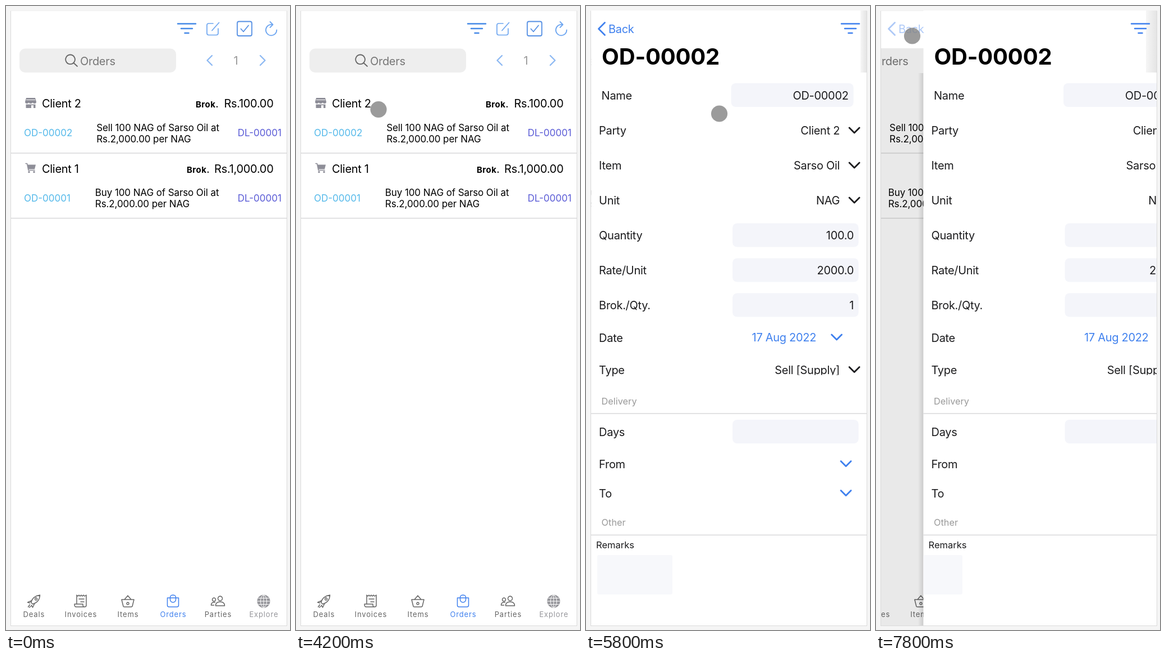
An HTML page for the animation above (8 s loop, 506 by 1107 pixels).

```html
<!DOCTYPE html>
<html lang="en">
<head>
<meta charset="utf-8">
<title>Orders</title>
<style>
  html, body { margin: 0; width: 100%; height: 100%; overflow: hidden; background: #f5f5f5; }
  svg { display: block; width: 506px; height: 1107px; }
  text { font-family: Inter, Roboto, sans-serif; white-space: pre; }
  .line { fill: none; stroke-linecap: round; stroke-linejoin: round; }
</style>
</head>
<body>
<svg viewBox="0 0 506 1107">
  <defs>
    <clipPath id="screen"><rect x="9" y="8" width="491" height="1091"/></clipPath>
    <clipPath id="typeClip"><rect x="300" y="625" width="160" height="29.5"/></clipPath>
    <linearGradient id="shade">
      <stop offset="0" stop-color="#000" stop-opacity="0"/>
      <stop offset="1" stop-color="#000" stop-opacity=".13"/>
    </linearGradient>
    <linearGradient id="edge">
      <stop offset="0" stop-color="#f6f6f6"/>
      <stop offset="1" stop-color="#e4e4e4"/>
    </linearGradient>
  </defs>
  <rect x="8.5" y="8" width="492" height="1091.5" fill="#fff" stroke="#dadada"/>
  <rect x="8" y="7" width="493" height="1.5" fill="#f5f5f5"/>
  <g clip-path="url(#screen)">
    <g id="list"></g>
    <rect id="dim" x="9" y="75" width="491" height="1024"/>
    <g id="listNav"></g>
    <g id="detail">
      <rect x="-1" y="119" width="10" height="980" fill="url(#shade)"/>
      <rect x="9" y="8" width="491" height="1091" fill="#fff"/>
      <g id="head"></g>
      <g id="form"></g>
    </g>
    <rect id="remarks" y="974" height="70" rx="3" fill="#f7f8fb"/>
    <rect id="band" y="8" height="110" fill="url(#edge)"/>
    <g id="back"></g>
    <g id="filter"></g>
  </g>
  <g id="move">
    <path d="M0-11 4.6-6H1.5V-1.5H6V-4.6L11 0 6 4.6V1.5H1.5V6H4.6L0 11-4.6 6H-1.5V1.5H-6V4.6L-11 0-6-4.6V-1.5H-1.5V-6H-4.6Z"
      stroke="#fff" stroke-width="2" paint-order="stroke"/>
  </g>
  <g id="touch">
    <circle id="ring" r="33.5" fill="none" stroke="#000" stroke-width="2.4"/>
    <circle r="14.6" fill="#808080" fill-opacity=".79"/>
  </g>
</svg>
<script>
const $ = id => document.getElementById(id);
const BLUE = '#3f80ee', INK = '#1c1c1e', GREY = '#8e8e98';

// Markup helpers
const text = (x, y, str, { size = 20, color = INK, anchor = 'start', weight = 400, track = -0.015 * size, extra = '' } = {}) =>
  `<text x="${x}" y="${y}" font-size="${size}" fill="${color}" text-anchor="${anchor}" font-weight="${weight}" letter-spacing="${track}" ${extra}>${str}</text>`;
const line = (d, color, width = 2) => `<path class="line" d="${d}" stroke="${color}" stroke-width="${width}"/>`;
const box = (x, y, w, h, r, fill) => `<rect x="${x}" y="${y}" width="${w}" height="${h}" rx="${r}" fill="${fill}"/>`;
const rule = y => box(9, y - 0.7, 491, 1.4, 0, '#d6d6d8');
const down = (x, y, color) => line(`M${x - 9} ${y - 4.5}l9 9 9-9`, color, 2.8);
const bars = (x, color) => line(`M${x - 16} 31.5h32M${x - 10} 40h20M${x - 3.5} 48h7`, color, 2.5);
const at = (x, y, body) => `<g transform="translate(${x} ${y})">${body}</g>`;

const store = `<path fill="${GREY}" d="M-8-9H8L10-2Q10 1 7 1 5 1 3.5-.5 2 1 0 1T-3.5-.5Q-5 1-7 1-10 1-10-2ZM-8.5 2.5H8.5V9H5V4H1V9H-8.5Z"/>
  <path stroke="#fff" d="M-8-5.5H8"/>`;
const cart = `<path fill="${GREY}" d="M-6-6H9L7 2H-4Z"/>` + line('M-9-8h2.5L-4 4H7', GREY, 1.6) +
  `<circle cx="-3" cy="7" r="1.7" fill="${GREY}"/><circle cx="6" cy="7" r="1.7" fill="${GREY}"/>`;

const row = (y, icon, name, fee, feeX, order, textX, verb) => {
  const note = { size: 17, color: '#000', track: -0.1 };
  return at(44, y - 1, icon) +
    text(64, y + 7, name, { color: '#000' }) +
    text(feeX, y + 7, 'Brok.', { size: 15, weight: 700, color: '#000', anchor: 'end', track: 0.5 }) +
    text(476.5, y + 7, fee, { color: '#000', anchor: 'end' }) +
    text(32, y + 58, order, { size: 17, color: '#54b9ea', track: 0 }) +
    text(textX, y + 48.5, `${verb} 100 NAG of Sarso Oil at`, note) +
    text(textX, y + 68.5, 'Rs.2,000.00 per NAG', note) +
    text(412.8, y + 58, 'DL-00001', { size: 17, color: '#5a5bd6', track: 0 }) +
    rule(y + 88);
};

// Each tab: label, centre, colour, icon drawn around the origin
const tabs = [
  ['Deals', 49.5, '#666', 'M-5 2Q-2-9 11-11 10 2-2 5ZM-4-1-11 2-7 3M1 5-2 11-4 7M-7 6-10 10M-4 8-8 11M4-6a2 2 0 1 0 .1 0'],
  ['Invoices', 133, '#666', 'M-7 5V-11L-5-9-3-11-1-9 1-11 3-9 5-11 7-9 10-11V7Q10 10 7 10H-8Q-11 10-11 5H4V8Q5 10 7 10M-3-4H6M0 1H6'],
  ['Items', 217, '#666', 'M-11-3H11L8 9Q7 10 6 10H-6Q-8 10-8 9ZM-6-3 0-10 6-3M0 2a2 2 0 1 0 .1 0'],
  ['Orders', 297.5, BLUE, 'M-10-6H10V7Q10 10 7 10H-7Q-10 10-10 7ZM-5-6V-7A5 4 0 0 1 5-7V-6M-5-3A5 5 0 0 0 5-3V-6M-5-3V-6'],
  ['Parties', 377.5, '#666', 'M4-9a4 4 0 1 0 .1 0M-4 8Q-4 1 4 1T12 8ZM-7-6a3 3 0 1 0 .1 0M-12 7Q-12 2-7 2H-5M-12 7H-7'],
];
const globe = `<circle r="11.5" fill="#96969b"/>` +
  `<g class="line" stroke="#fff" stroke-width="1"><path d="M0-11V11M-11 0H11M-9-5.5H9M-9 5.5H9"/><ellipse rx="5.5" ry="11"/></g>`;
const tabLabel = (x, label, color) =>
  text(x + 0.4, 1084, label, { size: 13, color, anchor: 'middle', track: 0.85 });

$('list').innerHTML =
  `<rect id="field" x="24" y="75.5" width="279" height="42.5" rx="10" fill="#eee"/>` +
  line('M114.5 86.5a8.3 8.3 0 1 0 .1 0M120.5 101 127 107', '#666', 1.8) +
  text(132, 104.5, 'Orders', { color: '#777' }) +
  line('M367 88l-8.5 8.5 8.5 8.5M453 88l8.5 8.5-8.5 8.5', '#8fbaf3', 2.4) +
  text(409.5, 104, '1', { color: '#999', anchor: 'middle' }) +
  row(173, store, 'Client 2', 'Rs.100.00', 379, 'OD-00002', 161.2, 'Sell') +
  row(288.5, cart, 'Client 1', 'Rs.1,000.00', 363, 'OD-00001', 158.8, 'Buy') +
  tabs.map(([label, x, color, d]) => at(x, 1056, line(d, color, 1.5)) + tabLabel(x, label, color)).join('') +
  at(459, 1056, globe) + tabLabel(459, 'Explore', '#96969b');

$('listNav').innerHTML =
  bars(322, '#4589e6') +
  line('M369 31H361Q358 31 358 34V48Q358 51.5 361 51.5H374.5Q378 51.5 378 48V40M367 43.5 379.5 29.5', '#6ea6f0', 1.7) +
  line('M415 27.5H435Q438 27.5 438 30.5V50Q438 53 435 53H415Q412 53 412 50V30.5Q412 27.5 415 27.5ZM418.5 40.5l4.5 5 9-11', '#5690e4', 1.8) +
  line('M474 33A9.7 9.7 0 1 0 482.3 42.5M470.5 28l5 5-5 5', '#6ea6f0', 1.8);

$('head').innerHTML =
  text(28, 103.5, 'OD-00002', { size: 40, weight: 700, color: '#000', track: -0.2 }) +
  text(27.5, 166, 'Name', { extra: 'id="name"' });

const input = (y, value) => box(261, y - 21, 224.5, 42, 8, '#f4f5fa') + text(477, y + 7, value, { anchor: 'end' });
const menu = (y, value, extra) => text(452, y + 7.5, value, { anchor: 'end', extra }) + down(478, y, INK);
const caption = (y, str) => text(27.5, y, str, { size: 16.3, color: '#999', track: 0 });
const fields = [
  ['Party', 220.5, menu(220.5, 'Client 2')],
  ['Item', 282.5, menu(282.5, 'Sarso Oil')],
  ['Unit', 344.5, menu(344.5, 'NAG')],
  ['Quantity', 406.5, input(406.5, '100.0')],
  ['Rate/Unit', 468.5, input(468.5, '2000.0')],
  ['Brok./Qty.', 530.5, input(530.5, '1')],
  ['Date', 588, text(410, 595, '17 Aug 2022', { color: BLUE, anchor: 'end' }) + down(446.5, 587.5, BLUE)],
  ['Type', 645, menu(645, 'Sell [Supply]', 'clip-path="url(#typeClip)"')],
  ['Days', 755.5, input(755, '')],
  ['From', 812.5, down(463, 812, BLUE)],
  ['To', 864.5, down(463, 864, BLUE)],
];
$('form').innerHTML =
  box(258.5, 137, 218, 42, 8, '#f4f5fa') + text(467.5, 166, 'OD-00002', { anchor: 'end' }) +
  fields.map(([label, y, body]) => text(23, y + 7.5, label) + body).join('') +
  caption(707, 'Delivery') + rule(723) + caption(922, 'Other') + rule(938.5) +
  text(18, 962, 'Remarks', { size: 16.5, track: 0 });

$('back').innerHTML = line('M33.5 29.5 22.5 40.5 33.5 51.5', BLUE, 2.8) + text(40, 48, 'Back', { color: BLUE });
$('filter').innerHTML = bars(471, BLUE);

// Pointer path: time, x, y
const arrow = [[800, 407, 150], [1000, 300, 91], [1200, 123, 160], [1400, 180, 240], [1800, 284.5, 307], [2000, 315, 380]];
const finger = [[2200, 334, 440], [2600, 334, 445], [3800, 144, 188], [4000, 109, 195], [4200, 147, 183.5],
  [4800, 237.5, 191], [6200, 237.5, 191], [7200, 64.5, 53], [8000, 64.5, 53]];

const STEP = 200, LOOP = 8000, WIDTH = 491;
const clamp = v => Math.min(1, Math.max(0, v));

function along(path, t) {
  const i = path.findIndex(k => k[0] >= t);
  const b = path[i], a = path[Math.max(0, i - 1)];
  const u = b === a ? 0 : (t - a[0]) / (b[0] - a[0]);
  return `translate(${a[1] + (b[1] - a[1]) * u} ${a[2] + (b[2] - a[2]) * u})`;
}

// Distance of the detail page from its resting place
function slide(t) {
  if (t < 7800) return WIDTH * (1 - clamp((t - 5180) / 660)) ** 3;
  return 75.5;
}

const set = (id, attrs) => { for (const k in attrs) $(id).setAttribute(k, attrs[k]); };
const show = (id, on) => set(id, { visibility: on ? 'visible' : 'hidden' });

function draw(t) {
  const off = slide(t), p = 1 - off / WIDTH;
  const popping = t >= 7800, loaded = t >= 5600;

  set('list', { transform: `translate(${-0.33 * WIDTH * p} 0)` });
  set('field', { opacity: clamp(1 - p * 1.4) });
  set('dim', { opacity: 0.1 * p });
  set('listNav', { opacity: clamp(1 - p * 2) });
  set('detail', { transform: `translate(${off} 0)` });
  show('detail', p > 0);
  set('name', { opacity: loaded ? 1 : 0.55 });
  show('form', loaded);

  const left = Math.max(20, 9 + off);
  set('remarks', { x: left, width: Math.max(0, 154 - left) });
  show('remarks', loaded);

  const bandX = t < 6000 ? 489 : 481;
  set('band', { x: bandX, width: 500 - bandX });
  show('band', t >= 5800);

  set('back', { opacity: popping ? 0.42 : t >= 7600 ? 0.8 : clamp(p * 1.5) });
  set('filter', { opacity: clamp(p * 1.5) });

  const pointing = t >= 800 && t < 2200;
  show('move', pointing);
  if (pointing) set('move', { transform: along(arrow, t) });
  const touching = t >= 2200;
  show('touch', touching);
  if (touching) set('touch', { transform: along(finger, t) });
  show('ring', t === 5000 || t === 7600);
}

const start = performance.now();
function tick() {
  const t = (performance.now() - start) % LOOP;
  draw(Math.floor(t / STEP) * STEP);
  requestAnimationFrame(tick);
}
tick();
</script>
</body>
</html>
```
